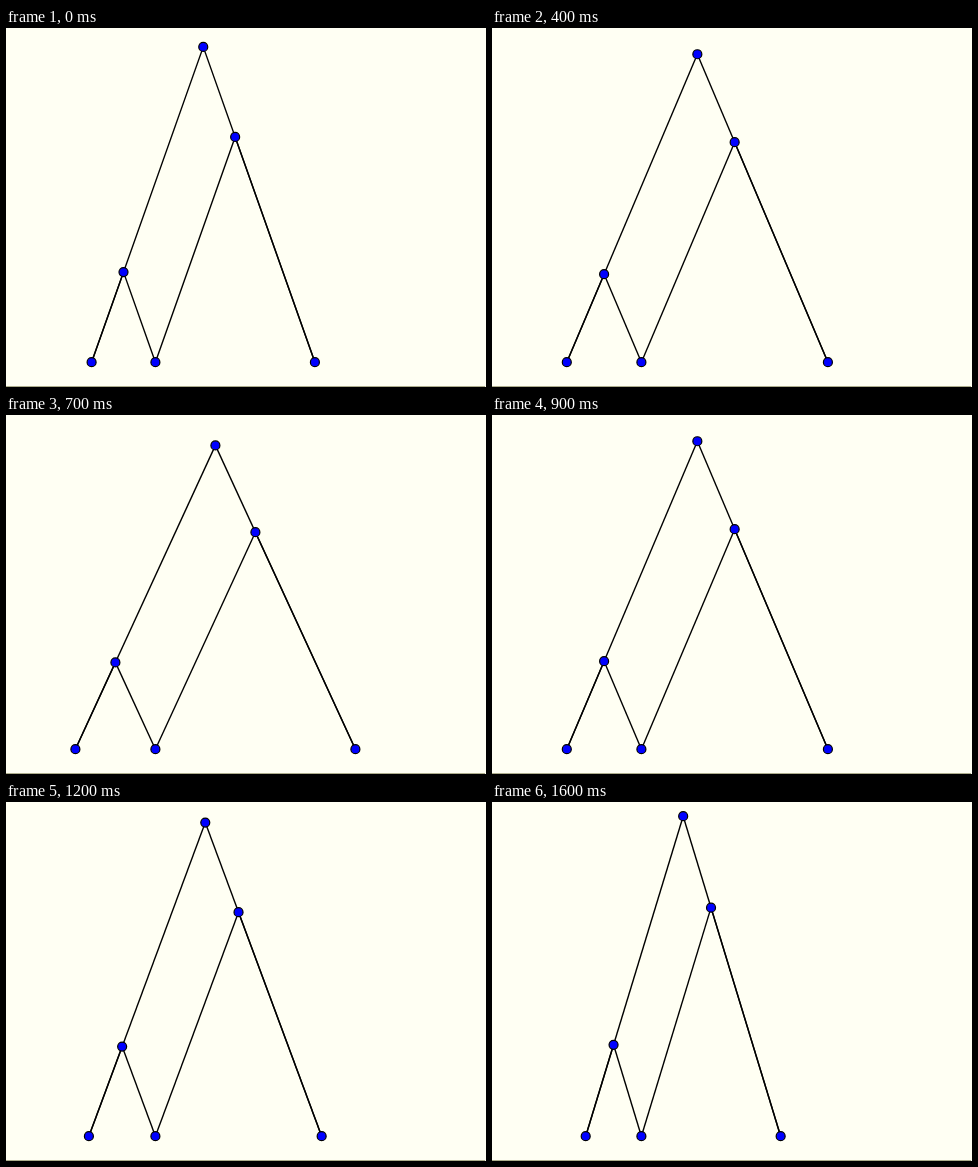
Recreate the animation shown at these times as an HTML page with a canvas. Size 480 px wide and 359 px high, loop 1.7 s.

```html
<!DOCTYPE html>
<html lang="en">
<head>
<meta charset="utf-8">
<title>Pantograph linkage</title>
<style>
  html, body { margin: 0; width: 100%; height: 100%; overflow: hidden; background: #fffff3; }
  canvas { display: block; }
</style>
</head>
<body>
<canvas id="stage" width="480" height="359"></canvas>
<script>
const ctx = document.getElementById('stage').getContext('2d');
const STEP_MS = 100;
const STEPS = 17;
const ARM = 334.5;
const pivot = { x: 149.4, y: 334.2 };

// Opens for six steps, rests one step, then closes; the loop restarts with a jump.
function spreadAt(step) {
  const stepsFromWidest = step < 7 ? 6 - step : step - 7;
  return 40 - 1.35 * stepsFromWidest;
}

function linkage(spread) {
  const height = Math.sqrt(ARM ** 2 - (3.5 * spread) ** 2);
  const joint = (across, up) => ({
    x: pivot.x + across * spread,
    y: pivot.y - up * height
  });
  return {
    leftFoot: joint(-2, 0),
    lowJoint: joint(-1, 2 / 7),
    middleFoot: joint(0, 0),
    apex: joint(1.5, 1),
    highJoint: joint(2.5, 5 / 7),
    rightFoot: joint(5, 0)
  };
}

function drawBar(from, to) {
  ctx.beginPath();
  ctx.moveTo(from.x, from.y);
  ctx.lineTo(to.x, to.y);
  ctx.stroke();
}

function drawJoint({ x, y }) {
  ctx.beginPath();
  ctx.arc(x, y, 4.5, 0, Math.PI * 2);
  ctx.fill();
  ctx.stroke();
}

function draw(step) {
  ctx.fillStyle = '#fffff3';
  ctx.fillRect(0, 0, 480, 359);
  ctx.fillStyle = '#adad8c';
  ctx.fillRect(0, 358, 479, 1);

  const p = linkage(spreadAt(step));
  ctx.strokeStyle = '#000';
  ctx.lineWidth = 1.4;
  drawBar(p.apex, p.leftFoot);
  drawBar(p.apex, p.rightFoot);
  drawBar(p.lowJoint, p.middleFoot);
  drawBar(p.highJoint, p.middleFoot);
  // The outer lower bars overlap the long arms and look heavier.
  drawBar(p.lowJoint, p.leftFoot);
  drawBar(p.highJoint, p.rightFoot);

  ctx.fillStyle = '#00f';
  ctx.lineWidth = 1.2;
  Object.values(p).forEach(drawJoint);
}

function tick() {
  draw(Math.floor(performance.now() / STEP_MS) % STEPS);
  requestAnimationFrame(tick);
}
tick();
</script>
</body>
</html>
```
